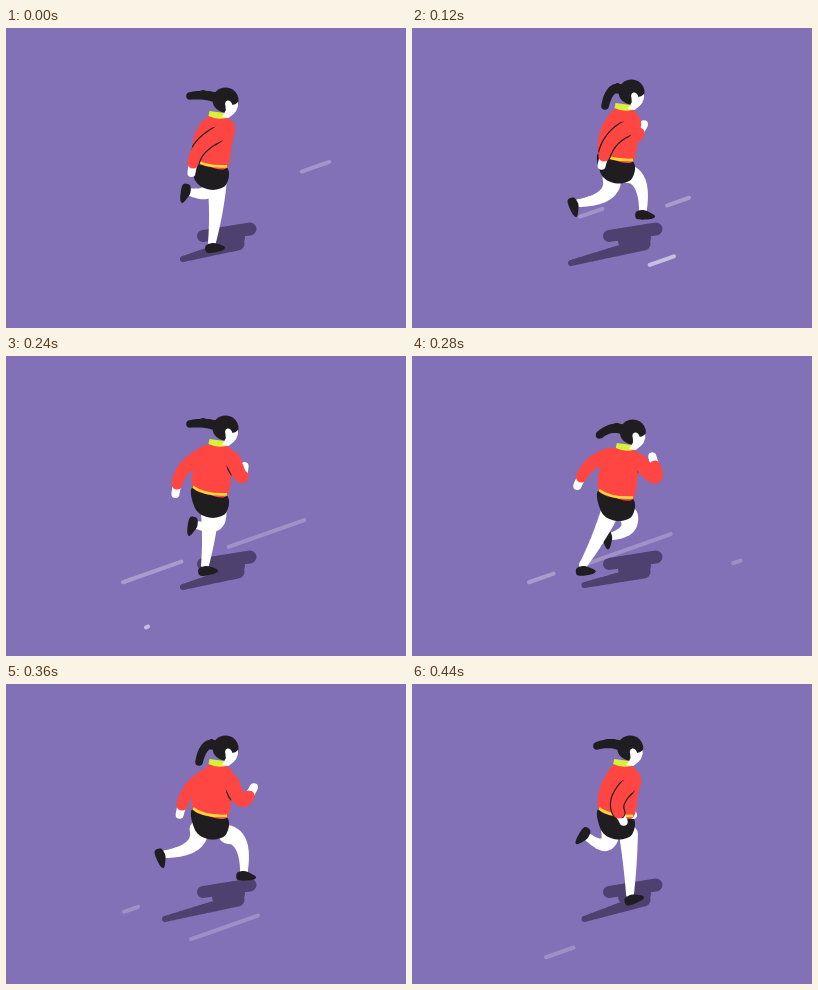
Recreate the animation shown at these times as an HTML page with a canvas. Size 400 by 300 pixels, loop 0.48 s.

```html
<!DOCTYPE html>
<html>
<head>
<meta charset="utf-8">
<style>
html, body { margin: 0; height: 100%; overflow: hidden; background: #8271b7; }
canvas { display: block; }
</style>
</head>
<body>
<canvas id="stage" width="400" height="300"></canvas>
<script>
const ctx = document.getElementById('stage').getContext('2d');
const BLACK = '#201d20', RED = '#ff4643', LIME = '#d9f038', YELLOW = '#ffd83b';
const WHITE = '#fff', SHADE = '#4e406f';
const STEP = 40, STEPS = 12;

// One full cycle; the opposite limb runs half a cycle later.
const LEG = { // knee, ankle, shoe angle
  0: [210, 185, 206, 214, -.15],
  1: [193, 188, 178, 214, -.1],
  2: [187, 179, 161, 195, 1.05],
  3: [195, 168, 167, 175, 1.2],
  5: [202, 168, 184, 159, 2.15],
  7: [217, 173, 201, 180, 1.35],
  8: [227, 163, 213, 176, 1.25],
  9: [236, 159, 238, 186, 0],
  11: [218, 181, 218, 210, -.35]
};
const ARM = { // elbow, wrist
  0: [190, 116, 187, 135],
  2: [198, 104, 184, 121],
  3: [197, 108, 192, 128],
  5: [222, 118, 231, 130],
  7: [250, 134, 243, 110],
  9: [235, 126, 243, 112],
  11: [200, 116, 207, 129]
};

// Ground streaks: both ends leave x0 at t0 and run to x1, each with its own pace.
const SLOPE = -.353;
const streaks = [
  { x0: 352, y0: 196.5, x1: 140, t0: 30, left: [205, .75], right: [212, 1], alpha: .55 },
  { x0: 333, y0: 130.5, x1: 150, t0: -35, left: [172, 1], right: [178, 1.8], alpha: .25 },
  { x0: 316, y0: 156, x1: 117, t0: 74, left: [150, 1], right: [235, 1], alpha: .3 },
  { x0: 330, y0: 153, x1: 118, t0: 160, left: [158, 1], right: [207, 2], alpha: .23 },
  { x0: 333, y0: 203, x1: 134, t0: 273, left: [117, 1], right: [190, 1.15], alpha: .22 }
];

const mix = (a, b, k) => a + (b - a) * k;
const wave = (i, peak, period) => Math.cos(2 * Math.PI * (i - peak) / period);

function pose(keys, i) {
  const wrap = n => (n + STEPS) % STEPS;
  let a = 0, b = 0;
  while (!keys[wrap(i - a)]) a++;
  while (!keys[wrap(i + b)]) b++;
  const next = keys[wrap(i + b)];
  return keys[wrap(i - a)].map((v, n) => mix(v, next[n], a / (a + b || 1)));
}

// Tapered curve from (x0,y0) to (x2,y2), bent towards (x1,y1).
function limb([x0, y0, x1, y1, x2, y2], r0, r1, color, from = 0) {
  const curve = (a, b, c, k) => mix(mix(a, b, k), mix(b, c, k), k);
  ctx.beginPath();
  for (let k = from; k < 1.01; k += .02) {
    const x = curve(x0, x1, x2, k), y = curve(y0, y1, y2, k), r = mix(r0, r1, k);
    ctx.moveTo(x + r, y);
    ctx.arc(x, y, r, 0, 7);
  }
  ctx.fillStyle = color;
  ctx.fill();
}

const bar = (x0, y0, x1, y1, r0, r1, color) =>
  limb([x0, y0, (x0 + x1) / 2, (y0 + y1) / 2, x1, y1], r0, r1, color);

// Smooth closed curve through points.
function blob(p) {
  const path = new Path2D(), n = p.length, v = i => p[(i + n) % n];
  path.moveTo(p[0], p[1]);
  for (let i = 0; i < n; i += 2) {
    path.bezierCurveTo(
      v(i) + (v(i + 2) - v(i - 2)) / 6, v(i + 1) + (v(i + 3) - v(i - 1)) / 6,
      v(i + 2) - (v(i + 4) - v(i)) / 6, v(i + 3) - (v(i + 5) - v(i + 1)) / 6,
      v(i + 2), v(i + 3));
  }
  return path;
}

function fill(path, color) {
  ctx.fillStyle = color;
  ctx.fill(path);
}

function stroke(path, color, width, cap) {
  ctx.strokeStyle = color;
  ctx.lineWidth = width;
  ctx.lineCap = cap;
  ctx.stroke(path);
}

function shifted(x, y, drawPart) {
  ctx.save();
  ctx.translate(x, y);
  drawPart();
  ctx.restore();
}

function drawShadow(i) {
  const x = 168 - 9 * wave(i, 3, 6), y = 233 - 4 * wave(i, 1, 6);
  bar(x, y, 232, 216, 3, 6.5, SHADE);
  bar(197, 208, 244, 201, 6, 6.5, SHADE);
  bar(213, 213, 232, 210, 7, 7, SHADE);
}

function drawStreak({ x0, y0, x1, t0, left, right, alpha }, ms) {
  const end = ([duration, power]) =>
    mix(x0, x1, Math.min(1, Math.max(0, (ms - t0) / duration)) ** power);
  const a = end(left), b = end(right), y = x => y0 + (x - x0) * SLOPE;
  if (b - a < .5) return;
  const path = new Path2D(`M${a} ${y(a)}L${b} ${y(b)}`);
  stroke(path, `rgba(255,255,255,${alpha})`, 4, 'round');
}

function drawLeg(i, bob) {
  const [kx, ky, ax, ay, angle] = pose(LEG, i);
  const hx = 211 - 11 * wave(i, 3, STEPS), hy = 156 + bob;
  const bend = (knee, hip, ankle) => 1.6 * knee - .3 * (hip + ankle);
  limb([hx, hy, bend(kx, hx, ax), bend(ky, hy, ay), ax, ay], 9.5, 4, WHITE);
  shifted(ax, ay, () => {
    ctx.rotate(angle);
    fill(blob([-7, 3, 0, 1, 6, 3, 12, 7, 8, 10, -6, 10]), BLACK);
  });
}

function drawArm(i, bob, torso) {
  const [ex, ey, wx, wy] = pose(ARM, i);
  const arm = [222 - 6 * wave(i, 1.3, STEPS), 103 + bob, ex, ey, wx, wy];
  const reach = 10 / Math.hypot(wx - ex, wy - ey);
  bar(wx, wy, wx + (wx - ex) * reach, wy + (wy - ey) * reach, 4.5, 4, WHITE);
  if (torso) {
    ctx.save();
    ctx.clip(torso);
    limb(arm, 9, 6.8, BLACK, .15);
    ctx.restore();
  }
  limb(arm, 7.8, 5.6, RED);
}

function drawHead(i) {
  limb([207, 68, 197, 65, 188 - 4.5 * wave(i, 0, 6), 76 - 9.5 * wave(i, -.3, 6)], 5, 3.8, BLACK);
  fill(new Path2D('M203 82L218 84L220 89Q210 91 202 87Z'), LIME);
  const hair = new Path2D();
  hair.ellipse(219, 71, 13, 12.5, 0, 0, 7);
  fill(hair, BLACK);
  fill(new Path2D('M219 77C217 71 224 69 226 76Q229 76 231.5 73Q233 82 222 89L215 88L218 84Q220 81 219 77Z'), WHITE);
}

function draw(i) {
  ctx.fillStyle = '#8271b7';
  ctx.fillRect(0, 0, 400, 300);
  drawShadow(i);
  streaks.forEach(s => drawStreak(s, i * STEP));

  const bounce = -3 + 8 * wave(i, 1, 6), hips = .8 * bounce, chest = .6 * bounce;
  const sway = .5 + 1.5 * wave(i, 1.5, 6);
  const opposite = i + STEPS / 2;

  drawLeg(i, hips);
  shifted(-7, -5, () => drawLeg(opposite % STEPS, hips));
  fill(blob([187, 130, 220, 138, 220, 156, 205, 161, 190, 153]
    .map((v, n) => n % 2 ? v + hips : v)), BLACK);

  shifted(-16, -7, () => drawArm(opposite % STEPS, chest));
  const torso = blob([
    204 + sway, 87 + bounce, 220 + sway, 89 + bounce, 229, 98 + chest, 226, 115 + chest,
    221, 139 + hips, 203, 138 + hips, 187, 131 + hips, 187, 112 + chest, 193, 97 + chest]);
  fill(torso, RED);
  stroke(new Path2D(`M187 ${130 + hips}Q198 ${138.5 + hips} 221 ${137.5 + hips}`), YELLOW, 2.6, 'butt');
  drawArm(i, chest, torso);
  shifted(sway, bounce, () => drawHead(i));
}

function tick() {
  draw(Math.floor(performance.now() / STEP) % STEPS);
  requestAnimationFrame(tick);
}
tick();
</script>
</body>
</html>
```
